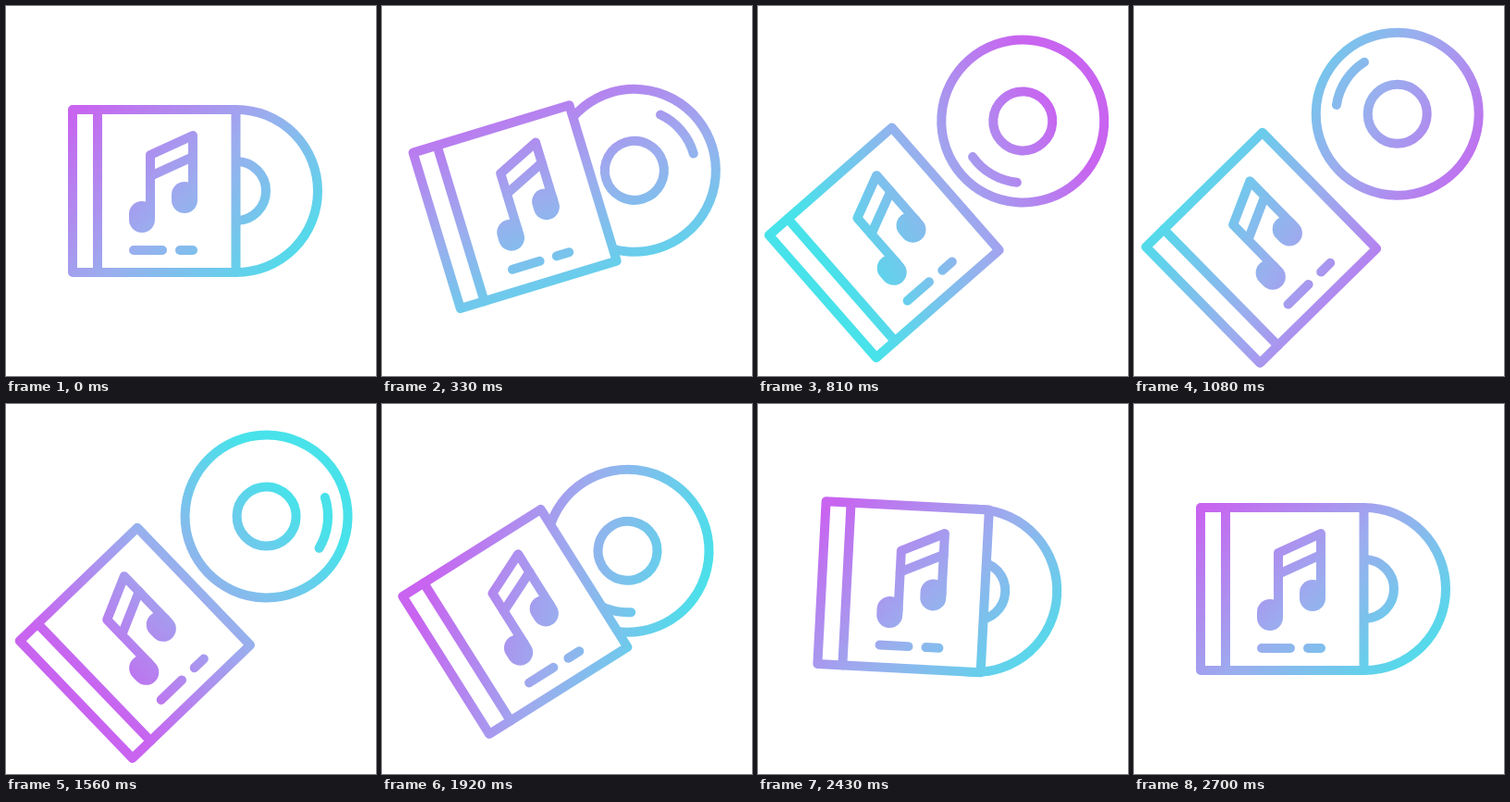
These frames come from a looping animation (400 by 400 pixels, 4.73 s). An HTML page with a canvas:

```html
<!DOCTYPE html>
<html lang="en">
<head>
<meta charset="utf-8">
<title>Music album</title>
<style>
  html, body { margin: 0; width: 100%; height: 100%; overflow: hidden; background: #fff; }
  canvas { display: block; }
</style>
</head>
<body>
<canvas id="stage" width="400" height="400"></canvas>
<script>
const ctx = document.getElementById('stage').getContext('2d');
const LOOP = 4730, STEP = 30, RAD = Math.PI / 180;

// time, tilt, case offset, disc offset, disc spin, gradient angle
const KEYS = [
  [0, 0, -40, 49, -180, 45],
  [300, -15, -57, 73, -60, 65],
  [600, -35.7, -80, 107.4, 58, 108],
  [1080, -44.5, -87.8, 118.8, 233, 212],
  [1560, -43.9, -84.4, 113.2, 386, 316],
  [1920, -32.2, -66.6, 77.4, 479, 374],
  [2190, -1.6, -50.8, 25, 518, 398],
  [2300, 4, -46, 28, 528, 402],
  [2700, 0, -40, 49, 540, 405]
];

const slope = (i, k) => (KEYS[i + 1][k] - KEYS[i][k]) / (KEYS[i + 1][0] - KEYS[i][0]);

// Tangent that keeps the curve from overshooting its keys
function tangent(i, k) {
  if (i === 0 || i === KEYS.length - 1) return 0;
  const a = slope(i - 1, k), b = slope(i, k);
  return a * b > 0 ? 2 * a * b / (a + b) : 0;
}

function valueAt(t, k) {
  const last = KEYS.length - 1;
  if (t >= KEYS[last][0]) return KEYS[last][k];
  let i = 0;
  while (t >= KEYS[i + 1][0]) i++;
  const h = KEYS[i + 1][0] - KEYS[i][0], u = (t - KEYS[i][0]) / h, v = 1 - u;
  return (1 + 2 * u) * v * v * KEYS[i][k] + u * v * v * h * tangent(i, k)
       + u * u * (3 - 2 * u) * KEYS[i + 1][k] - u * u * v * h * tangent(i + 1, k);
}

function line(...p) {
  ctx.beginPath();
  for (let i = 0; i < p.length; i += 2) ctx.lineTo(p[i], p[i + 1]);
  ctx.stroke();
}

function arc(r, from = 0, to = 360) {
  ctx.beginPath();
  ctx.arc(0, 0, r, from * RAD, to * RAD);
  ctx.stroke();
}

function noteHead(x, y) {
  ctx.beginPath();
  ctx.roundRect(x - 14, y - 17, 28, 34, 14);
  ctx.fill();
}

function drawDisc(offset, spin) {
  ctx.save();
  ctx.translate(offset, 0);
  arc(88);
  arc(32);
  arc(66.5, spin, spin + 49);
  ctx.restore();
}

function drawCase(offset) {
  ctx.save();
  ctx.translate(offset - 160, -200);
  ctx.globalCompositeOperation = 'destination-out';
  ctx.fillRect(72, 112, 176.5, 176);
  ctx.globalCompositeOperation = 'source-over';
  ctx.strokeRect(72, 112, 176.5, 176);
  line(99, 112, 99, 288);
  line(156, 225, 156, 161, 202, 140, 202, 205);
  line(156, 184, 202, 163);
  noteHead(147, 228);
  noteHead(193, 207);
  line(138, 264, 169, 264);
  line(188, 264, 202, 264);
  ctx.restore();
}

// Colours everything drawn so far with one gradient across the stage
function tint(angle) {
  const x = 150 * Math.cos(angle * RAD), y = 150 * Math.sin(angle * RAD);
  const g = ctx.createLinearGradient(200 - x, 200 - y, 200 + x, 200 + y);
  g.addColorStop(0, '#c864f0');
  g.addColorStop(0.5, '#9aaeee');
  g.addColorStop(1, '#48e2ea');
  ctx.globalCompositeOperation = 'source-in';
  ctx.fillStyle = g;
  ctx.fillRect(0, 0, 400, 400);
}

function draw(t) {
  const [tilt, caseX, discX, spin, angle] = [1, 2, 3, 4, 5].map(k => valueAt(t, k));
  ctx.clearRect(0, 0, 400, 400);
  ctx.save();
  ctx.lineWidth = 10;
  ctx.lineCap = ctx.lineJoin = 'round';
  ctx.translate(200, 200);
  ctx.rotate(tilt * RAD);
  drawDisc(discX, spin);
  drawCase(caseX);
  ctx.restore();
  ctx.save();
  tint(angle);
  ctx.restore();
}

let start;
function tick(now) {
  start ??= now;
  draw(Math.floor((now - start) % LOOP / STEP) * STEP);
  requestAnimationFrame(tick);
}
draw(0);
requestAnimationFrame(tick);
</script>
</body>
</html>
```
